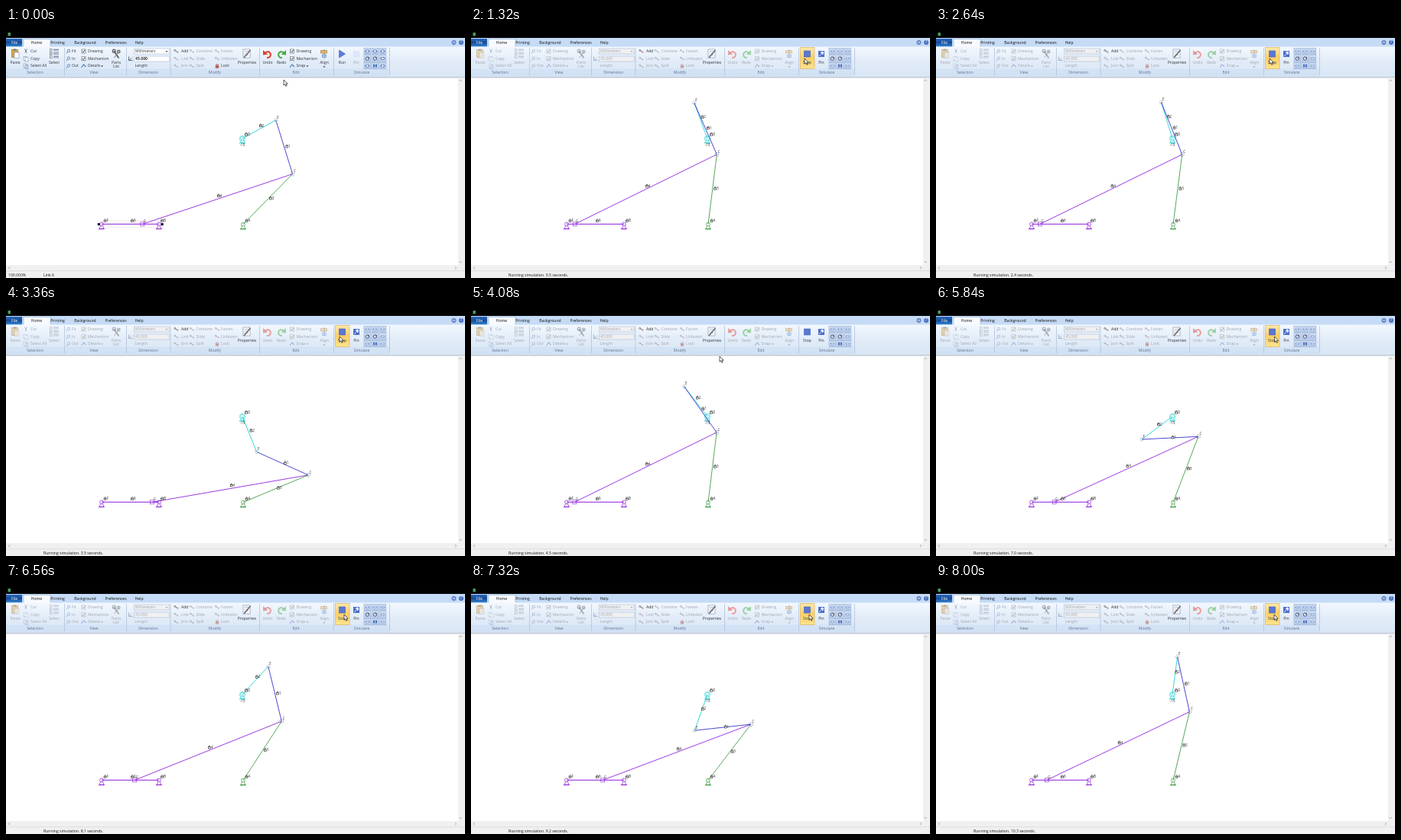
Animation of 600 by 328 pixels, one loop 8040 ms. Source, as an HTML page with a canvas:

```html
<!DOCTYPE html>
<html>
<head>
<meta charset="utf-8">
<title>Linkage simulation</title>
<style>
html, body { margin: 0; width: 100%; height: 100%; overflow: hidden; background: #fff; }
canvas { display: block; }
</style>
</head>
<body>
<canvas id="stage" width="600" height="328"></canvas>
<script>
const g = document.getElementById('stage').getContext('2d');
const LOOP = 8040, RUN_AT = 20;
const DARK = '#30343c', PALE = '#a0a6b0', BLUE = '#5577cc', TEAL = '#22d3d0',
      GREEN = '#2a942e', VIOLET = '#8a18dc', NAVY = '#2a2ac8';

const CURSOR = [[0, 363, 68], [3, 363, 68], [16, 436, 40], [84, 436, 40],
                [96, 325, 66], [99, 325, 66], [114, 443, 40], [157, 442, 40]];
const CRANK = [[24, 28.9], [31, 110.2], [63, 467], [98, 847.6],
               [123, 1106.3], [157, 1487.4], [192, 1882.5]];

function at(keys, tick) {
  if (tick <= keys[0][0]) return keys[0].slice(1);
  const i = keys.findIndex(k => k[0] > tick);
  if (i < 0) return keys[keys.length - 1].slice(1);
  const a = keys[i - 1], b = keys[i], p = (tick - a[0]) / (b[0] - a[0]);
  return a.slice(1).map((v, j) => v + (b[j + 1] - v) * p);
}

function box(x, y, w, h, fill, stroke) {
  if (fill) { g.fillStyle = fill; g.fillRect(x, y, w, h); }
  if (stroke) { g.strokeStyle = stroke; g.lineWidth = .6; g.strokeRect(x, y, w, h); }
}
function path(pts, color, width = 1, fill) {
  g.beginPath();
  pts.forEach(p => g.lineTo(p[0], p[1]));
  if (fill) { g.closePath(); g.fillStyle = fill; g.fill(); }
  if (color) { g.strokeStyle = color; g.lineWidth = width; g.stroke(); }
}
function ring(x, y, r, color, width = .8, fill, a = 0, b = 7) {
  g.beginPath(); g.arc(x, y, r, a, b);
  if (fill) { g.fillStyle = fill; g.fill(); }
  if (color) { g.strokeStyle = color; g.lineWidth = width; g.stroke(); }
}
function text(s, x, y, color = DARK, align = 'left', size = 5.1, weight = '') {
  g.font = `${weight} ${size}px "Open Sans", "Noto Sans", sans-serif`;
  g.textAlign = align; g.textBaseline = 'middle';
  g.fillStyle = color; g.fillText(s, x, y);
}
function vertical(y0, y1, ...stops) {
  const f = g.createLinearGradient(0, y0, 0, y1);
  stops.forEach((c, i) => f.addColorStop(i / (stops.length - 1), c));
  return f;
}
function dim(on, draw) { g.globalAlpha = on ? 1 : .45; draw(); g.globalAlpha = 1; }
const ink = on => on ? DARK : PALE;
const big = (s, x, on, y = 46) => text(s, x, y, ink(on), 'center');
const drop = (x, y, on) => path([[x - 1.5, y - .8], [x + 1.5, y - .8], [x, y + 1]], null, 1, ink(on));

function column(names, x, on, iconX, icon) {
  names.forEach((s, i) => {
    const y = [30.5, 40.3, 50][i], lit = typeof on === 'function' ? on(i) : on;
    text(s, x, y, ink(lit));
    if (icon) dim(lit, () => icon(iconX, y, i));
  });
}
function check(x, y, i) {
  if (i > 1) return path([[x - 3, y + 2], [x, y - 2], [x + 3, y + 1]], BLUE, 1.2);
  box(x - 2.5, y - 2.5, 5, 5, '#fff', '#55585e');
  path([[x - 1.5, y], [x - .4, y + 1.3], [x + 1.7, y - 1.6]], '#222', .9);
}
function lens(x, y) {
  ring(x + .4, y - .6, 1.8, '#4d78b8', .8, '#dceafa');
  path([[x - 1, y + 1], [x - 2.8, y + 2.8]], '#6b6f78', 1);
}
function joint(x, y) {
  path([[x - 1.5, y - 1], [x + 2, y + 1.2]], '#8a8f9c', 1.1);
  ring(x - 1.8, y - 1.2, 1, '#555b68', .7, '#fff');
  ring(x + 2, y + 1.2, .8, '#b0604c', .6, '#fff');
}
function swoop(x, color, dir) {
  g.save(); g.translate(x, 34); g.scale(dir, 1);
  ring(0, 1, 3.9, color, 2, null, -2.5, 1.8);
  path([[-6, -5], [-6, 1.5], [.3, .5]], null, 1, color);
  g.restore();
}

function ribbon(running, hover) {
  const idle = !running;
  box(0, 0, 600, 13, '#000');
  box(2.5, 6, 3.5, 4.5, '#4a9a62');
  box(0, 13, 600, 12, '#c5dbf6');
  box(0, 14, 21, 10.5, vertical(14, 24, '#2a6bbf', '#174a94', '#2f82cf'));
  text('File', 11, 19.3, '#fff', 'center');
  box(23, 14.5, 35, 11, '#f7fafe', '#9fb6d4');
  [['Home', 40], ['Printing', 67.5], ['Background', 103.5], ['Preferences', 143.5], ['Help', 174]]
    .forEach(([s, x]) => text(s, x, 19.5, '#111', 'center'));
  ring(585.5, 19, 2.7, '#4467ae', .6, '#6e8fd2');
  path([[584, 19.8], [585.5, 18], [587, 19.8]], '#fff', .8);
  ring(595, 19, 2.7, '#3458a8', .6, '#5277c8');
  text('?', 595, 19.1, '#fff', 'center', 4.5);

  box(0, 24.5, 600, 40, vertical(24, 64, '#f3f8fe', '#e2ecf8', '#d9e6f5'));
  box(0, 53.5, 501, 10, 'rgba(190,212,238,.32)');
  [76.5, 157.5, 215, 331.5, 428.5, 501.5].forEach(x => path([[x, 26], [x, 62]], '#b2c5dd', .8));
  [['Selection', 38], ['View', 115], ['Dimension', 186], ['Modify', 273], ['Edit', 379], ['Simulate', 465]]
    .forEach(([s, x]) => text(s, x, 58.5, '#60728e', 'center'));

  dim(idle, () => {
    box(7.5, 28.5, 8, 10, '#d8a650', '#876a38');
    box(9.5, 27.5, 4, 2, '#777');
    box(11, 32, 6, 7.5, '#fff', '#7890b4');
  });
  big('Paste', 12, idle);
  column(['Cut', 'Copy', 'Select All'], 32, idle, 26, (x, y, i) => {
    if (!i) {
      path([[x - 1.5, y - 3], [x + 1, y + 2]], '#5f7394', .9);
      path([[x + 1.5, y - 3], [x - 1, y + 2]], '#5f7394', .9);
    } else {
      box(x - 3, y - 3, 4, 5, '#fff', '#7890b4');
      box(x - 1, y - 1.5, 4, 5, i > 1 ? '#bcd2f2' : '#fff', '#7890b4');
    }
  });
  dim(idle, () => [29, 33.5, 38].forEach(y => {
    box(57.5, y - 1.3, 2.6, 2.6, '#fff', '#44506a');
    path([[62, y - .8], [69, y - .8]], '#44506a', .8);
    path([[62, y + 1], [69, y + 1]], '#7d8aa4', .8);
  }));
  big('Select', 63, idle);

  column(['Fit', 'In', 'Out'], 86, idle, 81.5, lens);
  column(['Drawing', 'Mechanism', 'Details'], 107, idle, 101.5, check);
  drop(125.5, 50, idle);
  dim(idle, () => {
    path([[141, 30], [147.5, 39.5]], '#5c6066', 1.8);
    path([[147.5, 31], [141.5, 39]], '#85898f', 1.2);
    ring(141.2, 30.2, 2, '#5c6066', 1.2);
    ring(147.3, 31, 1.8, '#6c7076', 1.2, '#a9adb3');
  });
  big('Parts', 144, idle); big('List', 144, idle, 51);

  const field = idle ? '#fff' : '#f0f0f2';
  box(167.5, 27, 46, 7, field, '#a9bdd6');
  text('Millimeters', 169, 30.6, ink(idle)); drop(210, 30.7, idle);
  box(167.5, 37, 46, 7, field, '#a9bdd6');
  text('45.000', 169, 40.7, ink(idle), 'left', 5.1, idle ? 'bold' : '');
  text('Length', 168.5, 50, ink(idle));
  dim(idle, () => {
    path([[160.5, 37.5], [160.5, 42.5], [165.5, 42.5]], '#333', .7);
    path([[161, 42], [164.5, 39]], '#3c62ac', .8);
  });

  column(['Add', 'Link', 'Join'], 229, i => !i, 222.5, joint);
  column(['Combine', 'Slide', 'Split'], 248.5, false, 243, joint);
  column(['Fasten', 'Unfasten', 'Lock'], 281, i => idle && i > 1, 276, (x, y, i) => {
    if (i < 2) return joint(x, y);
    ring(x, y - 1, 1.5, '#8a4444', .8);
    box(x - 2.2, y - .8, 4.4, 3.5, '#b85a50');
  });
  box(310, 28, 9, 11, '#fff', '#7288a8');
  [30.5, 33, 35.5].forEach(y => path([[311.5, y], [317, y]], '#8da5cc', .7));
  path([[311, 39], [319.5, 29]], '#6e6660', 1.5);
  big('Properties', 315, true);

  dim(idle, () => { swoop(342, '#e23b30', 1); swoop(360, '#44ad3d', -1); });
  big('Undo', 342, idle); big('Redo', 360, idle);
  column(['Drawing', 'Mechanism', 'Snap'], 379.5, idle, 374, check);
  drop(394, 50, idle);
  dim(idle, () => {
    path([[416, 28], [416, 39.5]], '#5a7cb8', 1);
    box(411.5, 29.5, 8, 3.5, '#e6b566', '#9c7940');
    box(413.5, 35, 5, 3.5, '#a9c5ee', '#5a7cb8');
  });
  big('Align', 416, idle); drop(416, 51, idle);

  if (hover) box(430.5, 25.5, 18.5, 28, vertical(25, 54, '#fde9ae', '#fbcf69', '#fde48c'), '#d8ad50');
  if (running) box(435.5, 30, 8, 8, '#5a78d2', '#3c5ab4');
  else path([[435.5, 29], [443.5, 34], [435.5, 39]], '#3c5ab4', .6, '#5a7cdc');
  big(running ? 'Stop' : 'Run', 439.5, true);
  dim(running, () => {
    box(454, 30, 8, 8, running ? '#4c6fc8' : '#c5d6f3');
    path([[455, 37], [458, 34]], '#fff', .8);
    path([[457, 32], [460, 35], [461, 32], [459.5, 30.8]], '#fff', .5, '#e4ecfc');
  });
  big('Pin', 458, running);

  for (let i = 0; i < 9; i++) {
    const x = 468 + i % 3 * 10, y = 26.3 + Math.floor(i / 3) * 9.5;
    box(x, y, 8.8, 8.4, vertical(y, y + 8, '#d6e3f6', '#b8cdea'), '#8ea8d0');
    dim(idle || [3, 4, 7].includes(i), () => {
      const cx = x + 4.4, cy = y + 4.2;
      if (i === 7) { box(cx - 2.2, cy - 2, 1.7, 4, '#355bb0'); box(cx + .6, cy - 2, 1.7, 4, '#355bb0'); }
      else if (i === 3 || i === 4) {
        ring(cx, cy, 2.2, '#33406c', .9, '#f0f5ff');
        path([[cx, cy], [cx + 2, cy - 2]], '#333', .9);
      } else {
        path([[cx - 3, cy], [cx + 3, cy]], '#355bb0', .9);
        box(cx - 1.7, cy - 1.6, 3.4, 3.2, '#e6eefb', '#355bb0');
      }
    });
  }
}

function frame(status, running) {
  box(0, 64, 600, 247, '#fff');
  box(0, 64.4, 600, .9, '#9aa6b6');
  box(591, 65.5, 9, 246, '#f0f0f0');
  box(0, 311, 600, 7.5, '#f0f0f0');
  path([[592.5, 69.7], [594.2, 68], [595.9, 69.7]], '#888', .7);
  path([[592.5, 306], [594.2, 307.7], [595.9, 306]], '#888', .7);
  path([[5, 313], [3.3, 314.7], [5, 316.4]], '#888', .7);
  path([[587, 313], [588.7, 314.7], [587, 316.4]], '#888', .7);
  box(0, 318.5, 600, 10, '#f0f0f0');
  path([[0, 318.7], [600, 318.7]], '#d5d8dc', .7);
  if (!running) text('100.000%', 3, 324.8, '#222');
  text(status, 49, 324.8, '#111');
}

function lock(x, y) {
  ring(x, y - 1, 1, '#222', .6);
  box(x - 1.4, y - .4, 2.8, 2.2, '#fff', '#1c1c1c');
}
function label(s, x, y) { lock(x - 2, y); text(s, x - .1, y + .5, '#222', 'left', 4.5); }
function ground(x, y, color) {
  path([[x - 1.3, y + 2], [x - 3, y + 6], [x + 3, y + 6], [x + 1.3, y + 2]], color, .7);
  path([[x - 4, y + 6.2], [x + 4, y + 6.2]], color, .7);
  for (let i = -3; i < 4; i += 2) path([[x + i, y + 6], [x + i - 1, y + 7.5]], color, .4);
  ring(x, y, 2.4, color, .7, '#fff');
}

const A = [310, 257.5], D = [309, 145], F = [125, 257.3], B = [200, 257.3];
const CRANK_LEN = 50, COUPLER = 74, ROCKER = 92.3, ROD = 207;

function solve(deg) {
  const r = deg * Math.PI / 180;
  const E = [D[0] + CRANK_LEN * Math.cos(r), D[1] - CRANK_LEN * Math.sin(r)];
  const dx = E[0] - A[0], dy = E[1] - A[1], d = Math.hypot(dx, dy);
  const along = (ROCKER ** 2 - COUPLER ** 2 + d * d) / (2 * d);
  const off = Math.sqrt(Math.max(0, ROCKER ** 2 - along ** 2));
  const C = [A[0] + (along * dx - off * dy) / d, A[1] + (along * dy + off * dx) / d];
  const G = [C[0] - Math.sqrt(ROD ** 2 - (F[1] - C[1]) ** 2), F[1]];
  return { E, C, G };
}

function mechanism(deg, running) {
  const { E, C, G } = solve(deg);
  const mid = (p, q, dx, dy, s) => label(s, (p[0] + q[0]) / 2 + dx, (p[1] + q[1]) / 2 + dy);
  if (!running) {
    g.setLineDash([1, 1.2]);
    box(124.5, 252.8, 75.5, 9, null, '#e0a0aa');
    g.setLineDash([]);
  }
  ground(...F, VIOLET); ground(...B, VIOLET); ground(...A, GREEN);
  ground(D[0], D[1] - .5, TEAL);
  g.setLineDash([1.4, .7]);
  ring(...D, 3.7, TEAL, .9);
  g.setLineDash([]);
  path([F, B], VIOLET, 1.1);
  path([C, G], VIOLET, .85);
  path([A, C], GREEN, .8);
  path([D, E], TEAL, .9);
  path([E, C], NAVY, .85);
  box(G[0] - 2.5, G[1] - 2.5, 5, 5, null, VIOLET);
  g.setLineDash([1.5, .8]);
  ring(...E, 2.1, '#778', .6);
  ring(...C, 2.4, '#586088', .6);
  g.setLineDash([]);
  if (!running) {
    box(119.8, 256, 3, 3, '#000');
    box(202.7, 256, 3, 3, '#000');
  }
  text('-15', D[0], 154.3, '#222', 'center', 4.5);
  label('F', 131.5, 252.7); label('B', 206, 252.7);
  label('A', 316.5, 252.7); label('D', 316, 139.4);
  label('6', 167, 252.7);
  mid(E, C, 5.5, -1, '1');
  mid(D, E, 4, -5, '2');
  mid(A, C, 5.5, -1.3, '3');
  mid(C, G, 3.5, -4.5, '4');
  [['E', E], ['C', C], ['G', G]].forEach(([s, p]) =>
    text(s, p[0] + 1.5, p[1] - 3.4, '#333', 'left', 4.5));
}

function arrow(x, y) {
  path([[0, 0], [0, 7.2], [1.7, 5.7], [2.9, 8.3], [4.1, 7.7], [3, 5.3], [5.2, 5.2], [0, 0]]
    .map(p => [x + p[0], y + p[1]]), '#111', .7, '#fff');
}

function render(ms) {
  const tick = Math.floor(Math.floor(ms / 40) * .96 + .1);
  const running = tick >= RUN_AT;
  const [deg] = at(CRANK, tick), [x, y] = at(CURSOR, tick);
  const hover = x > 430 && x < 449 && y > 25 && y < 54;
  const seconds = ((deg - CRANK[0][1]) / 180).toFixed(1);
  ribbon(running, hover);
  frame(running ? `Running simulation. ${seconds} seconds.` : 'Link 6', running);
  mechanism(deg, running);
  arrow(x, y);
}

const start = performance.now();
(function loop() {
  render((performance.now() - start) % LOOP);
  requestAnimationFrame(loop);
})();
</script>
</body>
</html>
```
